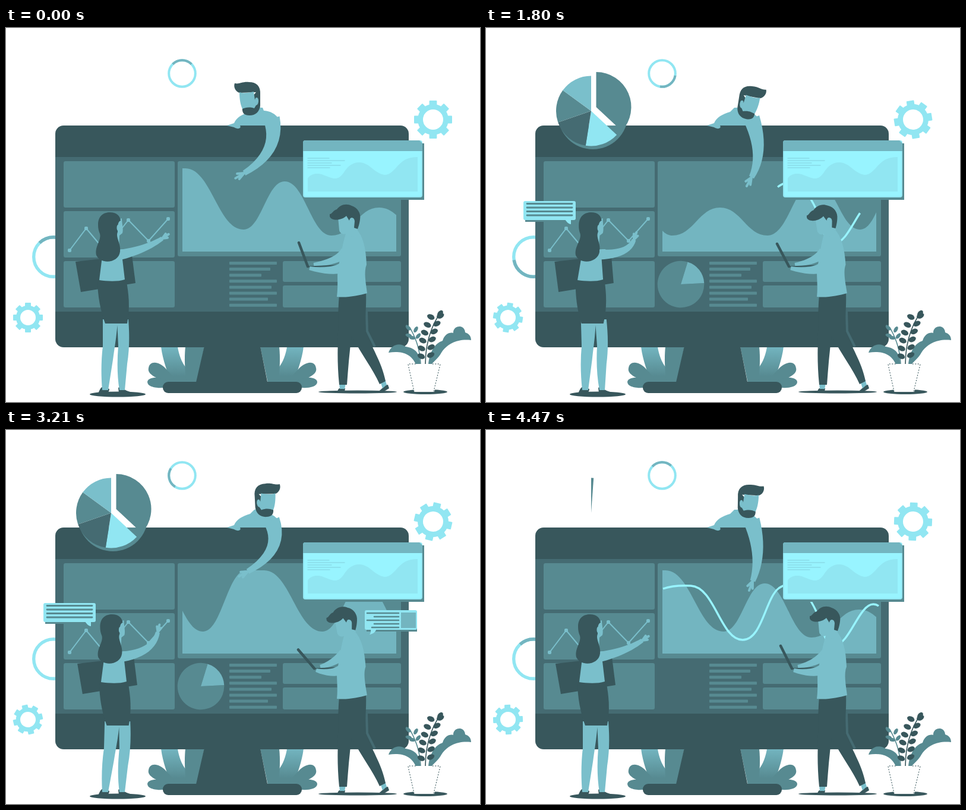
An HTML page that plays this animation: 798x629 px, repeating every 4.5 s.

```html
<!DOCTYPE html>
<html lang="en">
<head>
<meta charset="utf-8">
<title>Dashboard team</title>
<style>
html, body { margin: 0; width: 100%; height: 100%; overflow: hidden; background: #fff; }
svg { display: block; width: 798px; height: 629px; }
.dark { fill: #38575c; }
.deep { fill: #456b72; }
.mid { fill: #578a91; }
.soft { fill: #73b5c0; }
.skin { fill: #7abfcb; }
.cyan { fill: #91e6f2; }
.glow { fill: #98f4ff; }
.line { fill: none; stroke-linecap: round; stroke-linejoin: round; }
</style>
</head>
<body>
<svg viewBox="0 0 798 629">
<defs>
  <clipPath id="monClip"><rect x="83" y="164" width="595" height="373" rx="14"/></clipPath>
  <clipPath id="waveClip"><rect x="297" y="224" width="360" height="152"/></clipPath>
  <linearGradient id="leafFill" x1="0" y1="0" x2="0" y2="1">
    <stop offset="0" stop-color="#73b5c0"/><stop offset=".8" stop-color="#578a91"/>
  </linearGradient>
  <g id="tuft">
    <path fill="url(#leafFill)" d="M261 536H289C291 550 296 562 302 570L306 598H278C272 577 264 560 261 536Z"/>
    <path class="mid" d="M302 536H334L321 598H304C301 576 300 555 302 536Z"/>
    <path class="mid" d="M240 572C242 558 259 561 270 574C278 582 285 590 287 598H270C258 589 237 584 240 572Z"/>
    <path class="mid" d="M238 595C240 586 260 586 275 594V603C262 607 238 606 238 595Z"/>
  </g>
</defs>

<!-- rings and gears -->
<g fill="none">
  <circle cx="296.5" cy="76.5" r="22.3" stroke="#91e6f2" stroke-width="4"/>
  <path id="ringTop" stroke="#73b5c0" stroke-width="4"/>
  <circle cx="80" cy="385" r="33.3" stroke="#91e6f2" stroke-width="5.4"/>
  <path id="ringLeft" stroke="#73b5c0" stroke-width="5.4"/>
</g>
<g id="gearR"></g>
<g id="gearL"></g>

<!-- monitor -->
<use href="#tuft"/>
<use href="#tuft" transform="translate(762 0) scale(-1 1)"/>
<path class="dark" d="M335 530H427L441 600H319Z"/>
<rect class="dark" x="264" y="595" width="234" height="19" rx="9"/>
<rect class="dark" x="83" y="164" width="595" height="373" rx="14"/>
<rect class="deep" x="83" y="217" width="595" height="260"/>
<g class="mid">
  <rect x="97" y="224" width="187" height="78" rx="3"/>
  <rect x="97" y="308" width="187" height="78" rx="3"/>
  <rect x="97" y="392" width="187" height="78" rx="3"/>
  <rect x="289" y="224" width="376" height="160" rx="3"/>
  <rect x="466" y="392" width="199" height="35" rx="3"/>
  <rect x="466" y="433" width="199" height="37" rx="3"/>
</g>
<g id="rows" class="mid"></g>
<path id="wave" class="soft" clip-path="url(#waveClip)"/>
<path id="smallBody" class="mid"/>
<path id="smallWedge" class="soft"/>
<path class="line" stroke="#7abfcb" stroke-width="2" d="M107 374L135 337L166 374L206 323L240 358L273 321"/>
<g id="dots" class="skin"></g>
<path id="trace" class="line" pathLength="1000" stroke="#98f4ff" stroke-width="3.4" style="stroke-linecap:butt"
  d="M298 267C312 262 325 261 345 262C385 264 395 353 432 353C465 353 470 283 493 266C520 247 540 272 555 303C565 330 570 363 587 362C612 361 628 293 652 293Q657 293 661 296"/>

<!-- big pie -->
<g clip-path="url(#monClip)"><circle id="pieShade" class="mid" cx="180" cy="145" r="59"/></g>
<g id="pie"></g>

<!-- man on top -->
<path class="skin" d="M372 164L384 160C388 150 398 145 411 141L418 134H432L434 139C450 140 462 150 461 164H394C397 169 390 171 384 167Z"/>
<path id="topArm" class="skin"/>
<path id="topHand" class="line" stroke="#7abfcb" stroke-width="4"/>
<g id="topHead">
  <path class="skin" d="M-4 10H20L24 34H-4Z"/>
  <path class="dark" d="M-22 -25C-14 -23 -10 -28 2 -27C15 -27 22 -20 21 -6V12C20 23 13 29 3 29C-6 29 -10 25 -9 16L14 -10L-14 -9C-22 -12 -24 -20 -22 -25Z"/>
  <path class="skin" d="M-14 -10C-6 -7 4 -10 10 -11L12 3H16C19 3 18 12 14 12L11 17C2 14 -4 16 -9 18C-12 12 -14 2 -14 -10Z"/>
  <ellipse class="skin" cx="15" cy="4" rx="3" ry="5"/>
</g>

<!-- floating window -->
<path class="mid" d="M504 200H700V194H704V289H504Z"/>
<rect class="cyan" x="500" y="189" width="201" height="96" rx="4"/>
<rect class="glow" x="502" y="205" width="197" height="78" rx="2"/>
<path class="soft" d="M500 207V193Q500 189 504 189H696L701 194V207Z"/>
<path class="cyan" d="M508 275V253C513 245 524 243 534 247C550 253 558 258 568 244C580 224 596 222 610 231C624 242 635 252 647 244C662 233 665 217 693 217V275Z"/>
<path class="line" stroke="#8adbe8" stroke-width="1.5" d="M508 219H544M508 223H570M508 227H548M508 231H563M508 235H545"/>

<!-- potted plant -->
<ellipse class="dark" cx="706" cy="612" rx="37" ry="4"/>
<path class="mid" d="M644 546C648 533 662 528 673 536C690 538 698 549 697 566H690C682 547 665 543 644 546Z"/>
<path class="mid" d="M711 566C713 545 722 530 735 526C738 515 747 511 753 513C752 500 772 497 773 512C780 514 783 519 783 525C758 522 741 533 733 546C728 555 722 559 716 566Z"/>
<g id="sprigs"></g>
<path fill="#fff" d="M677 565H731L721 612H687Z"/>
<path class="line" stroke="#38575c" stroke-dasharray="1.5 3" d="M677 566L687 611M731 566L720 611M679 565H690M718 565H730"/>

<!-- woman -->
<ellipse class="dark" cx="188" cy="616" rx="47" ry="4.6"/>
<path class="dark" d="M155 615C158 608 160 603 164 604L174 607C174 614 168 616 155 615ZM189 605C194 602 199 610 209 612C207 616 196 617 190 614Z"/>
<path id="wLegs" class="skin" d="M163 490H188C187 515 183 535 180 558L172 609H162C160 585 160 560 163 535ZM187 490H206C208 515 208 540 204 565L200 609H191C187 585 187 560 189 535Z"/>
<g id="wTop">
  <path class="dark" d="M117 393L212 382L218 429L126 444Z"/>
  <path class="dark" d="M156 422L202 422C207 448 209 470 204 497H167C158 473 155 450 154 430Z"/>
  <path class="skin" d="M162 384C170 374 190 372 202 372L196 389L200 423C188 427 170 426 157 424Z"/>
  <path class="skin" d="M182 325L195 320C195 329 198 338 196 345L191 349L190 376H178V340Z"/>
  <path class="dark" d="M155 331C155 316 164 310 175 310C186 310 192 316 193 324C188 325 188 334 188 343C184 352 194 363 192 376C190 395 160 399 152 382C149 367 161 357 158 346C156 341 155 337 155 331Z"/>
  <ellipse class="skin" cx="189" cy="336" rx="2.5" ry="5"/>
</g>
<path id="wArm" class="skin"/>
<path id="wHand" class="line" stroke="#7abfcb" stroke-width="4"/>

<!-- man with laptop -->
<path class="line" stroke="#456b72" stroke-width="4" style="stroke-linecap:butt" d="M607 477L608 510L621 536"/>
<ellipse class="dark" cx="592" cy="612" rx="66" ry="2.4"/>
<path class="dark" d="M558 612C559 605 564 604 571 606L570 612ZM627 611C634 607 637 600 643 600L645 606L635 612Z"/>
<path class="skin" d="M561 598H572L570 607H562ZM630 594L638 591L641 600L634 606Z"/>
<path class="dark" d="M561 448L606 444C607 470 604 490 605 508C614 535 633 562 639 594L629 599C618 574 598 548 582 518C578 545 576 573 574 600H561C558 570 558 545 559 520C559 495 559 470 561 448Z"/>
<path id="farArm" class="skin"/>
<path id="laptop" class="line" stroke="#38575c" stroke-width="4.5"/>
<path id="keys" class="line" stroke="#38575c" stroke-width="2"/>
<path id="nearArm" class="skin"/>
<g id="mTop">
  <path class="skin" d="M572 346L590 338C601 350 606 370 607 398C602 410 606 430 608 446C593 450 574 454 557 452C560 430 556 412 560 400C564 380 567 362 572 346Z"/>
</g>
<g id="mHead">
  <path class="skin" d="M559 318L582 312L592 336V350L571 352L572 346C567 348 562 345 561 340Z"/>
  <path class="dark" d="M545 313C549 313 551 306 557 305C562 298 572 294 582 299C592 302 598 312 596 322C595 330 593 335 592 338L586 336L587 325C587 318 580 318 578 324L573 316C565 324 548 325 545 317Z"/>
  <ellipse class="skin" cx="582" cy="325" rx="4" ry="6"/>
</g>

<!-- speech bubbles -->
<g id="bubL">
  <path class="mid" d="M66 295H151V326H143L145 332L136 326H66Z"/>
  <rect class="cyan" x="63" y="291" width="88" height="32" rx="3"/>
  <path class="cyan" d="M133 322H143L143 330C140 330 136 327 133 322Z"/>
  <path class="line" id="textL" stroke="#578a91" stroke-width="2.8" d="M69 295.5H145M69 302H145M69 308.5H145M69 315H145"/>
</g>
<g id="bubR">
  <path class="mid" d="M607 307H692V339H607Z"/>
  <rect class="cyan" x="604" y="303" width="88" height="33" rx="3"/>
  <path class="cyan" d="M612 344C615 341 614 338 614 334H624C622 340 618 343 612 344Z"/>
  <rect class="soft" x="665" y="307" width="25" height="26"/>
  <path class="line" id="textR" stroke="#578a91" stroke-width="2.6" d="M608 308H661M620 314H661M608 320H661M620 326H661M616 332H661"/>
</g>
</svg>

<script>
const LOOP = 4500, STEP = 30;
const MARKS = [0, 690, 1170, 1800, 2700, 3720, 4470];
const $ = id => document.getElementById(id);
const set = (id, name, v) => $(id).setAttribute(name, v);
const clamp = v => Math.max(0, Math.min(1, v));
const lin = (t, a, b) => clamp((t - a) / (b - a));
const ease = (t, a, b) => { const u = lin(t, a, b); return u * u * (3 - 2 * u); };
const polar = (x, y, r, deg) => {
  const a = (deg - 90) * Math.PI / 180;
  return [x + r * Math.cos(a), y + r * Math.sin(a)];
};

// Smooth curve through one value per mark, flat at turning points.
function slope(v, i) {
  if (i === 0 || i === v.length - 1) return 0;
  if ((v[i] - v[i - 1]) * (v[i + 1] - v[i]) <= 0) return 0;
  return (v[i + 1] - v[i - 1]) / (MARKS[i + 1] - MARKS[i - 1]);
}
function at(t, v) {
  let i = 0;
  while (i < MARKS.length - 2 && t >= MARKS[i + 1]) i++;
  const d = MARKS[i + 1] - MARKS[i], u = clamp((t - MARKS[i]) / d), w = 1 - u;
  return v[i] * w * w * (1 + 2 * u) + v[i + 1] * u * u * (3 - 2 * u)
    + d * u * w * (slope(v, i) * w - slope(v, i + 1) * u);
}

function arc(x, y, r, a, b) {
  const p = polar(x, y, r, a), q = polar(x, y, r, b);
  return `M${p}A${r} ${r} 0 ${b - a > 180 ? 1 : 0} 1 ${q}`;
}
function sector(x, y, r, a, b) {
  return b - a < 0.5 ? '' : `${arc(x, y, r, a, b)}L${x} ${y}Z`;
}

// Tapered limb running from a through b to c.
function limb(a, b, c, w0, w1) {
  const m = [0, 1].map(k => 2 * b[k] - (a[k] + c[k]) / 2);
  const left = [], right = [];
  for (let i = 0; i <= 12; i++) {
    const u = i / 12, v = 1 - u;
    const [x, y] = [0, 1].map(k => v * v * a[k] + 2 * u * v * m[k] + u * u * c[k]);
    const [dx, dy] = [0, 1].map(k => v * (m[k] - a[k]) + u * (c[k] - m[k]));
    const h = (w0 + (w1 - w0) * u) / 2 / Math.hypot(dx, dy);
    left.push([x - dy * h, y + dx * h]);
    right.unshift([x + dy * h, y - dx * h]);
  }
  const dir = Math.atan2(c[1] - m[1], c[0] - m[0]);
  return { d: `M${left.concat(right).join('L')}Z`, dir };
}
function fingers(p, dir, size) {
  return [[-0.35, 0.75], [0, 1], [0.45, 0.7]].map(([turn, len]) =>
    `M${p}L${p[0] + Math.cos(dir + turn) * size * len} ${p[1] + Math.sin(dir + turn) * size * len}`).join('');
}

// Static parts built from rules
function gear(id, R, hole) {
  const body = R * 0.81, w = R * 0.4;
  let s = `<circle r="${(body + hole) / 2}" fill="none" stroke="#91e6f2" stroke-width="${body - hole}"/>`;
  for (let i = 0; i < 8; i++)
    s += `<rect class="cyan" x="${-w / 2}" y="${-R}" width="${w}" height="${R * 0.28}" rx="1" transform="rotate(${i * 45})"/>`;
  $(id).innerHTML = s;
}
gear('gearR', 32, 17);
gear('gearL', 25, 13);

$('rows').innerHTML = [80, 69, 54, 80, 71, 80, 65, 80].map((w, i) =>
  `<rect x="376" y="${393 + i * 10.1}" width="${w}" height="5" rx="1"/>`).join('');
$('dots').innerHTML = [[107, 374], [135, 337], [206, 323], [240, 358], [273, 321]].map(([x, y]) =>
  `<rect x="${x - 3}" y="${y - 3}" width="6" height="6" rx="2"/>`).join('');

const leaf = (x, y, rx, ry, turn, cls) =>
  `<ellipse class="${cls}" rx="${rx}" ry="${ry}" transform="translate(${x} ${y}) rotate(${turn})"/>`;
let sprigs = '<path class="line" stroke="#38575c" stroke-width="1.6" d="M706 566C706 535 713 505 732 478"/>'
  + '<path class="line" stroke="#578a91" stroke-width="1.6" d="M698 566C697 545 693 527 680 504"/>';
for (let i = 0; i < 6; i++) {
  const y = 552 - i * 13.2, x = 706 + i * i * 0.65;
  sprigs += leaf(x - 7, y, 6.5, 4.3, 25, 'dark') + leaf(x + 9, y - 2, 6.5, 4.3, -25, 'dark');
}
sprigs += leaf(731, 480, 6, 4, -50, 'dark');
for (const [x, y, a] of [[677, 504, 50], [678, 517, 15], [690, 507, -60], [684, 521, 10], [694, 518, -50]])
  sprigs += leaf(x, y, 5.5, 3, a, 'mid');
$('sprigs').innerHTML = sprigs;

const SLICES = [[0, 133, 'mid'], [133, 189, 'cyan'], [189, 251, 'deep'], [251, 306, 'mid'], [306, 360, 'skin']];
$('pie').innerHTML = SLICES.map((s, i) => `<path id="slice${i}" class="${s[2]}"/>`).join('');

// Peaks and troughs of one wave period: offset, height
const PERIOD = 665;
const WAVE = [[0, 236], [98, 339], [167, 258], [246, 349], [326, 302], [406, 349], [487, 258], [562, 339], [635, 236]];
function drawWave(t) {
  const x0 = 302 - PERIOD * (1 + ease(t, 0, LOOP));
  let d = '', px, py;
  for (let n = 0; n < 4; n++) for (const [dx, y] of WAVE) {
    const x = x0 + n * PERIOD + dx;
    if (d) { const h = (x - px) * 0.44; d += `C${px + h} ${py} ${x - h} ${y} ${x} ${y}`; }
    else d = `M${x} ${y}`;
    px = x; py = y;
  }
  set('wave', 'd', `${d}V376H${x0}Z`);
}

function drawPies(t) {
  SLICES.forEach(([a, b], i) => {
    const grow = ease(t, 10 + i * 168, 178 + i * 168);
    const out = 4490 - (i + 1) * 190;
    const k = Math.min(grow, 1 - ease(t, out, out + 190));
    set('slice' + i, 'd', sector(177, 139.5, 59, a, a + (b - a) * k));
  });
  const pop = ease(t, 1230, 1560) - ease(t, 3240, 3540);
  set('slice0', 'transform', `translate(${8.5 * pop} ${-6.5 * pop})`);
  set('pieShade', 'opacity', ease(t, 850, 1050) - ease(t, 3450, 3600));

  const sweep = 360 * (lin(t, 20, 1000) - lin(t, 3500, 4470)), top = 377;
  set('smallBody', 'd', sector(328, 431, 39.3, top - Math.min(sweep, 290), top));
  set('smallWedge', 'd', sector(328, 431, 39.3, top - Math.max(290, sweep), top - 290));
}

function drawTrace(t) {
  let a = at(t, [0, 170, 373, 520, 945, 1000, 1000]);
  let b = at(t, [0, 265, 511, 928, 1000, 1000, 1000]);
  if (t > 3000) { a = 0; b = 1000 * ease(t, 3400, 4470); }
  set('trace', 'stroke-dasharray', `0 ${a} ${b - a} 2000`);
  set('trace', 'visibility', b - a > 1 ? 'visible' : 'hidden');
}

function drawWoman(t) {
  const hip = at(t, [0, 4, 1, -3, 1, 4, 0]), head = at(t, [0, 6, 1, 2, 1, 6, 0]);
  const low = hip / 110, up = (head - hip) / 110;
  set('wLegs', 'transform', `matrix(1 0 ${-low} 1 ${low * 608} 0)`);
  set('wTop', 'transform', `matrix(1 0 ${-up} 1 ${hip + up * 425} 0)`);
  const elbow = [at(t, [232, 237, 236, 230, 236, 237, 232]), at(t, [370, 367, 369, 375, 369, 367, 370])];
  const wrist = [at(t, [263, 251, 260, 249, 260, 251, 263]), at(t, [354, 335, 348, 356, 348, 335, 354])];
  const arm = limb([194 + hip, 381], elbow, wrist, 17, 7);
  set('wArm', 'd', arm.d);
  set('wHand', 'd', fingers(wrist, arm.dir, 13));
}

function drawTopMan(t) {
  const elbow = [at(t, [443, 462, 446, 458, 443, 455, 457]), at(t, [203, 196, 202, 206, 203, 196, 206])];
  const wrist = [at(t, [401, 427, 405, 447, 401, 420, 449]), at(t, [244, 231, 241, 251, 244, 234, 254])];
  const arm = limb([447, 152], elbow, wrist, 28, 9);
  set('topArm', 'd', arm.d);
  set('topHand', 'd', fingers(wrist, arm.dir, 17));
  const x = at(t, [407, 401, 402, 446, 435, 445, 445]);
  const y = at(t, [118, 125, 125, 125, 115, 119, 119]);
  const r = at(t, [0, -12, -11, 9, -7, 1, 1]);
  set('topHead', 'transform', `translate(${x} ${y}) rotate(${r}) scale(${t < 1485 ? 1 : -1} 1)`);
}

function drawLaptopMan(t) {
  const lean = at(t, [0, -6, 1, -3, 1, -7, 0]), nod = at(t, [0, -9, 0, -4, 0, -10, 0]);
  const k = lean / 105;
  set('mTop', 'transform', `matrix(1 0 ${-k} 1 ${k * 450} 0)`);
  set('mHead', 'transform', `translate(${lean} 0) rotate(${nod} 578 345)`);
  const tip = [at(t, [493, 487, 499, 490, 499, 485, 496]), at(t, [361, 370, 367, 363, 368, 370, 363])];
  const x = at(t, [509, 516, 525, 511, 526, 514, 516]);
  set('laptop', 'd', `M${tip}L${x - 1} 401`);
  set('keys', 'd', `M${x} 401.5L${x + 50} 399.5`);
  const far = limb([572 + lean, 376], [552 + lean / 2, 390], [x + 9, 398], 18, 6);
  const near = limb([586 + lean, 388], [557, 406], [x + 2, 404], 24, 6);
  set('farArm', 'd', far.d);
  set('nearArm', 'd', near.d);
}

function bubble(id, textId, t, start, end, x, y) {
  const s = ease(t, start, start + 150) - ease(t, end, end + 150);
  const tilt = -10 * (1 - s);
  set(id, 'transform', `translate(${x} ${y}) rotate(${tilt}) scale(${s}) translate(${-x} ${-y})`);
  set(id, 'visibility', s > 0.01 ? 'visible' : 'hidden');
  const len = 78 * ease(t, start + 130, start + 420);
  set(textId, 'stroke-dasharray', `${len} 78`);
  set(textId, 'visibility', s > 0.01 && len > 0 ? 'inherit' : 'hidden');
}

function draw(t) {
  const turn = 360 * t / LOOP;
  set('ringTop', 'd', arc(296.5, 76.5, 22.3, turn - 45, turn + 45));
  set('ringLeft', 'd', arc(80, 385, 33.3, -turn - 45, -turn + 45));
  set('gearR', 'transform', `translate(719 154) rotate(${-turn})`);
  set('gearL', 'transform', `translate(37 487) rotate(${turn})`);
  drawWave(t);
  drawPies(t);
  drawTrace(t);
  drawTopMan(t);
  drawWoman(t);
  drawLaptopMan(t);
  bubble('bubL', 'textL', t, 1045, 3330, 144, 331);
  bubble('bubR', 'textR', t, 2200, 3960, 613, 344);
}

const begin = performance.now();
function tick() {
  const t = (performance.now() - begin) % LOOP;
  draw(Math.floor(t / STEP) * STEP);
  requestAnimationFrame(tick);
}
tick();
</script>
</body>
</html>
```
